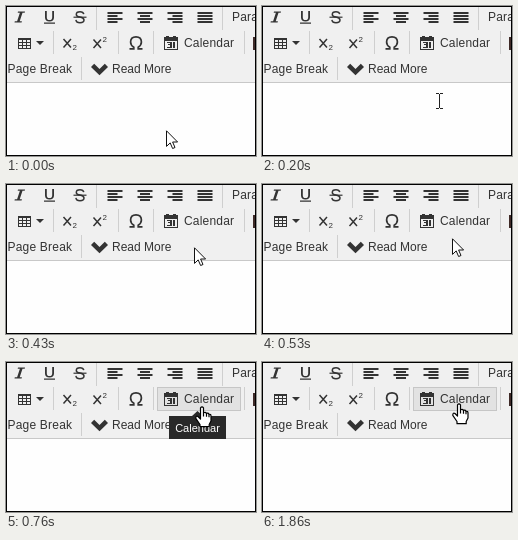
Animation, 250 px wide and 150 px high, one loop 2660 ms. Source, as an HTML page:

```html
<!DOCTYPE html>
<html lang="en">
<head>
<meta charset="utf-8">
<title>Toolbar hover</title>
<style>
html, body { margin: 0; width: 100%; height: 100%; overflow: hidden; background: #fff; }
svg { display: block; width: 250px; height: 150px; }
text { font-family: "Liberation Sans", Arial, sans-serif; fill: #333; white-space: pre; }
.label { font-size: 12px; letter-spacing: .2px; }
.tight { letter-spacing: 0; }
.crisp { shape-rendering: crispEdges; }
</style>
</head>
<body>
<svg viewBox="0 0 250 150">
  <rect width="250" height="150" fill="#fefefe"/>
  <rect width="250" height="77" fill="#f0f0f0"/>
  <rect class="crisp" y="76" width="250" height="1" fill="#c8c8c8"/>
  <path id="seps" class="crisp" fill="#cfcfcf"/>
  <rect id="hover" class="crisp" x="151.5" y="25.5" width="83" height="23" fill="#e2e2e2" stroke="#c6c6c6"/>

  <g fill="#333">
    <!-- italic, underline, strikethrough -->
    <path d="M12 5.500h7l-.3 1.200h-2.200l-2.800 8.600h2.200l-.3 1.200H8.500l.3-1.200h2.300l2.800-8.600h-2.200z"/>
    <path d="M39 5h1.800v6.200c0 2 1 2.900 2.700 2.900s2.700-.9 2.700-2.900V5H48v6.400c0 2.700-1.700 4.100-4.500 4.100S39 14.100 39 11.400zM38 16.500h11v1.200H38z"/>
    <path d="M77.800 8.200C77.400 6.500 76.200 5.800 74 5.800c-2.300 0-3.700.9-3.700 2.600 0 1.900 1.800 2.300 3.800 2.700 2.200.5 3.900 1 3.900 2.900 0 1.800-1.500 2.700-4 2.700-2.300 0-3.800-.8-4.100-2.900" fill="none" stroke="#333" stroke-width="1.500"/>
    <path d="M67.500 10.600h13v1.200h-13z"/>
    <path id="aligns"/>

    <!-- table menu -->
    <path class="crisp" fill-rule="evenodd" d="M12 32h13v11H12zM13 34h3v2h-3zM17 34h3v2h-3zM21 34h3v2h-3zM13 37h3v2h-3zM17 37h3v2h-3zM21 37h3v2h-3zM13 40h3v2h-3zM17 40h3v2h-3zM21 40h3v2h-3z"/>
    <path d="M30 35h8l-4 4z"/>

    <!-- subscript, superscript -->
    <path d="M57.500 33l7.500 8.500M65 33l-7.500 8.500M87.500 33.500l7.500 8.500M95 33.500l-7.500 8.500" stroke="#333" stroke-width="1.500"/>

    <!-- calendar -->
    <path class="crisp" fill-rule="evenodd" d="M158 31h14v13h-14zM159 35v8h12v-8z"/>
    <path class="crisp" d="M160 30h3v3h-3zM167 30h3v3h-3z"/>
    <path class="crisp" d="M161 36h5v6h-5v-1h3v-2h-2v-1h2v-1h-3zM167 36h2v6h-2z"/>

    <!-- next button, cut by the edge -->
    <path class="crisp" fill="#3f2a27" d="M247 31h3v13h-3z"/>

    <path d="M85 61l3.200-3.300 5.300 5.200 5.300-5.200L102 61l-8.500 8.300z"/>
  </g>
  <text x="66.500" y="44" font-size="8">2</text>
  <text x="96.500" y="36" font-size="8">2</text>
  <path d="M123.500 42.800h4.300v-1.600c-2-1.200-3.200-3-3.200-5.200 0-3.200 2.200-5.200 5.400-5.200s5.400 2 5.400 5.200c0 2.200-1.200 4-3.200 5.200v1.600h4.300" fill="none" stroke="#333" stroke-width="1.700"/>

  <g class="label">
    <text x="226" y="15">Paragraph</text>
    <text x="178" y="41">Calendar</text>
    <text x="1.500" y="67">Page Break</text>
    <text class="tight" x="106" y="67">Read More</text>
  </g>

  <g id="tip">
    <path d="M186 54l5.500-5 5.500 5z" fill="#292929"/>
    <rect x="163" y="54" width="57" height="23" fill="#292929"/>
    <text x="191.500" y="70" font-size="11" text-anchor="middle" style="fill:#fff">Calendar</text>
  </g>

  <path id="arrow" stroke="#111" fill="#fff" d="M.5.800V16.400L4.200 12.900 6.600 18.500 9 17.500 6.600 12H11.600z"/>
  <path id="beam" class="crisp" fill="#222" d="M-3 -8h3v1h1v-1h3v1h-3v14h3v1h-3v-1h-1v1h-3v-1h3v-14h-3z"/>
  <g id="hand" stroke="#000" stroke-width="1.200" fill="#fff" stroke-linejoin="round">
    <path d="M-1.500 1.800Q0-.2 1.500 1.800V6.800Q3.500 5.800 4.500 7.400 6.300 6.700 7 8.300 9 7.900 9 10V15L7.200 18.500V20.700H-2V18.500L-6.200 12.300Q-6.300 9.400-4 10.500L-1.500 13z"/>
    <path d="M1.500 6.800V10.500M4.500 7.400V10.800M7 8.300V11.300" fill="none"/>
  </g>

  <rect class="crisp" x=".5" y=".5" width="249" height="149" fill="none" stroke="#000"/>
</svg>
<script>
const LOOP = 2660;
const el = id => document.getElementById(id);

// separators: row top followed by x positions
el("seps").setAttribute("d", [[1, 90, 216], [25, 47, 112, 147, 238], [51, 75]]
  .map(([y, ...xs]) => xs.map(x => `M${x} ${y}h1v23h-1z`).join("")).join(""));

// paragraph alignment icons: left, centre, right, justify
const bars = [0, .5, 1, null].map((shift, n) =>
  [0, 1, 2, 3].map(i => {
    const w = i % 2 && shift !== null ? 10 : 15;
    return `M${101.5 + 30 * n + (15 - w) * (shift || 0)} ${6 + 3 * i}h${w}v2h${-w}z`;
  }).join(""));
el("aligns").setAttribute("d", bars.join(""));

// pointer path: time, x, y
const path = [[0, 160, 124], [200, 177, 95], [430, 188, 63], [530, 190, 54],
  [660, 193, 48], [760, 196, 44], [860, 197, 42], [1060, 197, 41]];

// the pointer is sampled at 0, 30 and 60 ms of every tenth of a second
function sample(t) {
  if (t >= 1060) return 1060;
  if (t >= 860) return 860;
  const rest = t % 100;
  return t - rest + (rest < 30 ? 0 : rest < 60 ? 30 : 60);
}

function pointer(t) {
  const i = Math.max(1, path.findIndex(p => p[0] >= t));
  const a = path[i - 1], b = path[i];
  const k = (t - a[0]) / (b[0] - a[0]);
  return [1, 2].map(n => Math.round(a[n] + (b[n] - a[n]) * k));
}

const show = (id, on) => { el(id).style.display = on ? "" : "none"; };

function draw(t) {
  const [x, y] = pointer(sample(t));
  const over = y < 48;
  const cursor = over ? "hand" : y > 84 && y < 110 ? "beam" : "arrow";
  for (const id of ["hand", "beam", "arrow"]) show(id, id === cursor);
  el(cursor).setAttribute("transform", `translate(${x} ${y})`);
  show("hover", over);
  show("tip", over && t < 1860);
}

const start = performance.now();
function tick() {
  draw((performance.now() - start) % LOOP);
  requestAnimationFrame(tick);
}
tick();
</script>
</body>
</html>
```
